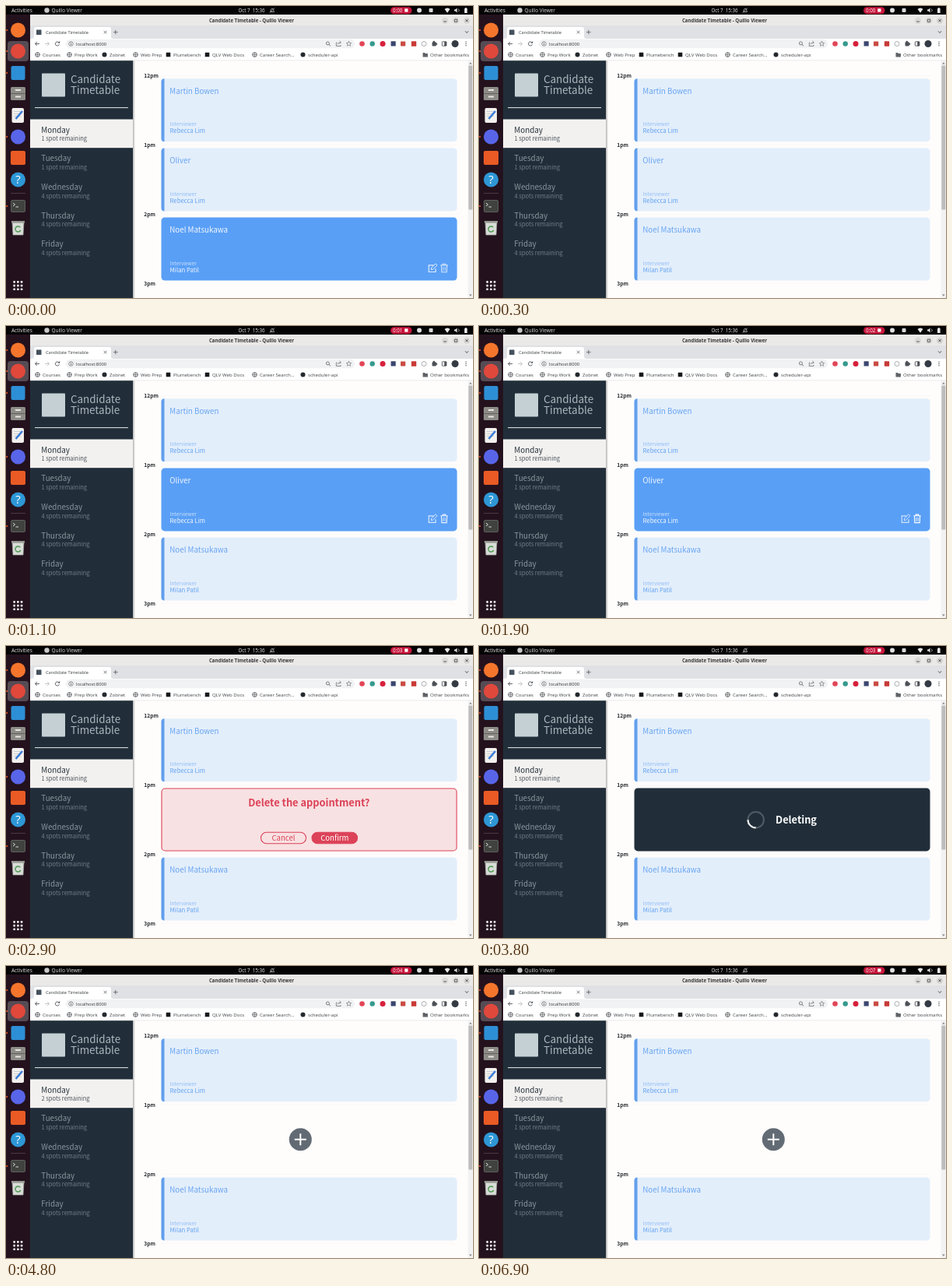
Write an HTML page with a canvas that moves like this. It is 600 px wide and 375 px high and loops after 7.9 s.

```html
<!DOCTYPE html>
<html lang="en">
<head>
<meta charset="utf-8">
<title>Candidate Timetable</title>
<style>
html, body { margin: 0; width: 100%; height: 100%; overflow: hidden; background: #fefdfc; }
canvas { display: block; width: 600px; height: 375px; }
</style>
</head>
<body>
<canvas id="stage"></canvas>
<script>
const LOOP = 7900;
const UI = '"Open Sans", "Noto Sans", sans-serif';
const PAGE = '"Noto Sans CJK JP", "Noto Sans CJK SC", "Noto Sans CJK KR", "Noto Sans CJK", "Noto Sans", sans-serif';
const NAVY = '#212e3a', BLUE = '#599ff6', RED = '#dc4258';

const canvas = document.getElementById('stage');
const ctx = canvas.getContext('2d');
const dpr = window.devicePixelRatio || 1;
canvas.width = 600 * dpr;
canvas.height = 375 * dpr;

function rect(x, y, w, h, fill) {
  ctx.fillStyle = fill;
  ctx.fillRect(x, y, w, h);
}

function round(x, y, w, h, r, fill, stroke, lw = 1) {
  ctx.beginPath();
  ctx.roundRect(x, y, w, h, r);
  if (fill) { ctx.fillStyle = fill; ctx.fill(); }
  if (stroke) { ctx.strokeStyle = stroke; ctx.lineWidth = lw; ctx.stroke(); }
}

function circle(x, y, r, fill, stroke, lw = 1) {
  ctx.beginPath();
  ctx.arc(x, y, r, 0, Math.PI * 2);
  if (fill) { ctx.fillStyle = fill; ctx.fill(); }
  if (stroke) { ctx.strokeStyle = stroke; ctx.lineWidth = lw; ctx.stroke(); }
}

function arc(x, y, r, a, b, color, lw) {
  ctx.beginPath();
  ctx.arc(x, y, r, a, b);
  ctx.strokeStyle = color;
  ctx.lineWidth = lw;
  ctx.stroke();
}

function path(d, color, lw = 1, fill) {
  const p = new Path2D(d);
  if (fill) { ctx.fillStyle = fill; ctx.fill(p); }
  if (color) { ctx.strokeStyle = color; ctx.lineWidth = lw; ctx.stroke(p); }
}

function text(str, x, y, size, color, font = UI, weight = 400, align = 'left') {
  ctx.font = `${weight} ${size}px ${font}`;
  ctx.textAlign = align;
  ctx.fillStyle = color;
  ctx.fillText(str, x, y);
}

function at(x, y, draw) {
  ctx.save();
  ctx.translate(x, y);
  draw();
  ctx.restore();
}

function topBar(t) {
  rect(0, 0, 600, 11, '#050405');
  text('Activities', 7, 7.8, 6.5, '#e4e4e4');
  circle(52.5, 5.5, 3.2, '#c8c8c8');
  text('Quillo Viewer', 58.5, 7.8, 6.4, '#e4e4e4');
  text('Oct 7  15:36', 315.5, 7.8, 6.2, '#ececec', UI, 500, 'center');
  path('M339.5 7.5H344.5L343.8 6V4.5Q342 1.6 340.2 4.5V6ZM339 8.5L345 2.5', '#d0d0d0', 0.7);

  round(494, 1.2, 27.5, 9, 4.5, '#c5143a');
  text('0:0' + Math.floor((t + 100) / 1000), 497, 7.9, 6.2, '#fff');
  rect(512.2, 3.4, 4.2, 4.2, '#fff');

  circle(531, 5.5, 3, '#e0e0e0');
  round(543.5, 3, 5, 5, 1, '#d8d8d8');
  path('M563.5 4Q567 0.9 570.5 4L567 8.8Z', null, 0, '#e8e8e8');
  path('M576 4.4H577.5L579.5 2.5V8.5L577.5 6.6H576Z', null, 0, '#e8e8e8');
  arc(579.7, 5.5, 2.4, -0.9, 0.9, '#e8e8e8', 0.7);
  round(589, 3, 3.6, 6, 0.6, '#e8e8e8');
  rect(590, 2.2, 1.6, 1, '#e8e8e8');
}

function dock() {
  rect(0, 11, 31, 364, '#23121d');
  round(2, 45, 27, 26, 4, '#574b53');
  circle(15.5, 31, 9.5, '#f5752c');
  circle(15.5, 58, 9.5, '#e0483c');
  round(6.5, 77, 18, 18, 2, '#2d8fd5');

  round(6, 104, 19, 17, 1.5, '#8d8c87');
  rect(6, 112, 19, 1, '#63625f');
  rect(12, 107, 7, 2, '#e9e7e2');
  rect(12, 115.5, 7, 2, '#e9e7e2');

  round(7.5, 131, 15.5, 19, 2, '#f2f0ed');
  [135, 138, 141].forEach(y => rect(10, y, 9, 0.7, '#b9c3cf'));
  path('M12.5 145L21 135', '#3a7bd8', 2.6);

  circle(15.5, 168, 9.5, '#5865e8');
  round(6, 186, 19, 18, 2, '#e95a25');
  circle(15.5, 223, 9.5, '#2e97d6');
  text('?', 15.5, 228.4, 15, '#fff', UI, 400, 'center');
  rect(6, 240, 19, 0.7, '#5a4c55');

  round(6.5, 249.5, 18, 15, 1.5, '#3f423f', '#6b6e6a', 0.8);
  path('M9 253L11.5 255L9 257M12.5 258H16', '#e9e9e9', 0.9);

  path('M8 277H23L22 294H9Z', '#a5a8a3', 0.7, '#d9dcd7');
  rect(7, 276, 17, 2.6, '#949891');
  arc(15.5, 286.5, 3.5, 0.4, 5.6, '#4f9a55', 1.5);

  for (const y of [31, 58, 86, 168, 257]) circle(1.2, y, 1.1, '#e95420');
  for (let i = 0; i < 9; i++) {
    round(9.3 + i % 3 * 4.7, 353 + Math.floor(i / 3) * 4.7, 2.7, 2.7, 0.7, '#f0eeef');
  }
}

function bookmark(label, x, icon) {
  text(label, x, 64.6, 6.1, '#404347');
  const cx = x - 6.5, cy = 62.5;
  if (icon === 'folder') {
    path(`M${cx - 3} ${cy - 2.5}h2.4l1 1h3v4.5h-6.4z`, null, 0, '#5f6368');
  } else if (icon === 'globe') {
    circle(cx, cy, 2.8, null, '#4b4f54', 0.9);
    path(`M${cx - 2.8} ${cy}h5.6M${cx} ${cy - 2.8}v5.6`, '#4b4f54', 0.6);
  } else if (icon === 'square') {
    round(cx - 2.8, cy - 2.8, 5.6, 5.6, 0.4, '#17191c');
  } else {
    circle(cx, cy, 3, '#24292e');
  }
}

function browser() {
  rect(31, 11, 569, 15, '#ebe9e8');
  text('Candidate Timetable - Quillo Viewer', 315.5, 21.1, 6.1, '#37383a', UI, 700, 'center');
  for (const x of [564, 578, 592]) circle(x, 18.7, 4.2, '#dad8d6');
  path('M562.2 20H565.8', '#333', 0.8);
  path('M576.4 17.2H579.6V20.4H576.4Z', '#333', 0.7);
  path('M590.4 17.1L593.6 20.3M593.6 17.1L590.4 20.3', '#333', 0.8);

  rect(31, 25, 569, 17, '#dfe1e4');
  path('M33 42Q36 42 36 39V30Q36 27 39 27H132Q135 27 135 30V39Q135 42 138 42Z', null, 0, '#fff');
  round(39, 30.5, 6.5, 6.5, 0.5, '#44515c');
  text('Candidate Timetable', 51, 36, 5.7, '#3c4043');
  path('M125.7 31.8L129.3 35.4M129.3 31.8L125.7 35.4', '#55595e', 0.8);
  path('M138 33.6H143.6M140.8 30.8V36.4', '#55595e', 0.8);
  path('M590 32.3L592 34.5L594 32.3', '#444', 0.9);

  rect(31, 42, 569, 28, '#fff');
  round(77, 42.8, 371, 11.5, 5.75, '#f0f2f3');
  path('M43 48.5H37.5M40 46L37.5 48.5L40 51', '#55595e', 0.9);
  path('M50 48.5H55.5M53 46L55.5 48.5L53 51', '#bdc0c4', 0.9);
  arc(66, 48.5, 2.6, 0.3, 5.5, '#55595e', 0.9);
  path('M69.2 45V47.8H66.4Z', null, 0, '#55595e');
  circle(83.5, 48.5, 2.7, null, '#5f6368', 0.7);
  rect(83.1, 48, 0.8, 2, '#5f6368');
  rect(83.1, 46.7, 0.8, 0.8, '#5f6368');
  text('localhost:8000', 90, 50.9, 5.8, '#33373b');

  circle(413.4, 47.9, 2, null, '#5f6368', 0.8);
  path('M414.9 49.4L417 51.4', '#5f6368', 0.9);
  path('M425.5 47H424.3V51.5H430V50M426 49.5Q426.5 46.8 430 46.8M428.5 45L430.4 46.8L428.5 48.5', '#5f6368', 0.7);
  path('M440.5 45.2L441.4 47.3L443.7 47.5L442 49L442.5 51.3L440.5 50.1L438.5 51.3L439 49L437.3 47.5L439.6 47.3Z', '#5f6368', 0.6);

  circle(457.5, 48.5, 3.3, '#e14658');
  circle(470.7, 48.5, 3.2, '#35998c');
  circle(484, 48.5, 3.5, '#d8203c');
  round(494.5, 45.3, 6.2, 6.2, 0.5, '#3c4770');
  round(507, 45.5, 6.2, 6, 0.5, '#c94b43');
  round(520.8, 45.3, 6.4, 6.4, 0.5, '#c83a36');
  circle(537, 48.5, 3, null, '#9fa3a7', 0.9);
  round(547.5, 46.3, 5.2, 5.2, 0.8, '#4c5055');
  circle(549.8, 46, 1.3, '#4c5055');
  circle(553, 48.8, 1.2, '#4c5055');
  round(560.3, 45.8, 5.6, 5.4, 0.6, null, '#4c5055', 0.9);
  rect(563.2, 45.8, 2.7, 5.4, '#4c5055');
  circle(577, 48.5, 4.5, '#343a42');
  for (let i = -1; i < 2; i++) circle(591, 48.5 + i * 2.2, 0.7, '#4c5055');

  bookmark('Courses', 47, 'globe');
  bookmark('Prep Work', 88, 'globe');
  bookmark('Zobnet', 133, 'dot');
  bookmark('Web Prep', 173, 'globe');
  bookmark('Plumebench', 215, 'square');
  bookmark('QLV Web Docs', 265, 'square');
  bookmark('Career Search…', 326, 'globe');
  bookmark('scheduler-api', 388, 'dot');
  bookmark('Other bookmarks', 545, 'folder');
  rect(31, 69.6, 569, 0.6, '#dedfe0');
}

function sidebar(t) {
  const shade = ctx.createLinearGradient(163, 0, 166, 0);
  shade.addColorStop(0, 'rgba(0,0,0,0.3)');
  shade.addColorStop(1, 'rgba(0,0,0,0)');
  rect(163, 70, 3, 305, shade);

  rect(31, 70, 132, 305, NAVY);
  round(46, 86.5, 30, 30, 1, '#c4d0d3');
  text('Candidate', 83, 99.2, 13.4, '#adb6bd', PAGE, 300);
  text('Timetable', 83, 112.6, 13.4, '#adb6bd', PAGE, 300);
  rect(37, 130, 120, 1.1, '#d4d8da');
  rect(31, 145.5, 132, 36.7, '#f3f1ef');

  const days = ['Monday', 'Tuesday', 'Wednesday', 'Thursday', 'Friday'];
  const spots = [t < 4600 ? 1 : 2, 1, 4, 4, 4];
  days.forEach((day, i) => {
    const y = 162.5 + i * 36.7, n = spots[i];
    text(day, 45.3, y, 9.8, i ? '#8c959c' : '#26323d', PAGE);
    text(`${n} spot${n > 1 ? 's' : ''} remaining`, 45.5, y + 10.7, 7.5, i ? '#737d86' : '#4a545e', PAGE, 300);
  });
}

function editIcon(x, y, color) {
  at(x, y, () => {
    path('M1.5 -3.6H-4.8V5H4V0.8', color, 1.2);
    path('M-1.8 2.2L-1.4 -0.4L4 -5.6L6 -3.6L0.7 1.6Z', color, 1);
  });
}

function trashIcon(x, y, color) {
  at(x, y, () => {
    path('M-4.7 -3.6H4.7M-1.7 -3.8V-5.3H1.7V-3.8M-3.6 -3.3L-3.2 5.2H3.2L3.6 -3.3', color, 1.1);
    path('M-1.5 -1.5V3.4M0 -1.5V3.4M1.5 -1.5V3.4', color, 0.6);
  });
}

function card(y, name, host, hover, glow = 0) {
  round(199.5, y, 380, 81, 4.5, hover ? BLUE : '#e3eefb');
  if (!hover) round(199.5, y, 4, 81, [4.5, 0, 0, 4.5], '#629fec');
  text(name, 210.3, y + 19.3, 9.75, hover ? '#f4f8fe' : '#66a4f0', PAGE);
  text('Interviewer', 210.5, y + 61.2, 6.45, hover ? '#cfe2fc' : '#8fbcf4', PAGE, 300);
  text(host, 210.5, y + 70.1, 7.75, hover ? '#f4f8fe' : '#62a2f0', PAGE);
  if (hover) {
    editIcon(548, y + 65, `rgba(255,255,255,${0.8 - glow * 0.1})`);
    trashIcon(563, y + 65, `rgba(255,255,255,${0.72 + glow * 0.28})`);
  }
}

function button(label, x, w, filled) {
  round(x, 239.2, w, 14.6, 7.3, filled ? RED : null, RED, 1.1);
  text(label, x + w / 2, 250, 9.6, filled ? '#fff' : RED, PAGE, 400, 'center');
}

function confirmCard(hover) {
  round(200, 183, 379, 80, 4.5, '#f8e1e2', RED, 1.1);
  text('Delete the appointment?', 389.3, 206, 12.8, RED, PAGE, 600, 'center');
  button('Cancel', 327.5, 58, false);
  button('Confirm', 393, 58.5, hover);
}

function deletingCard(t) {
  round(199.5, 182.4, 380, 81, 4.5, NAVY);
  const turn = (t - 3800) / 1000 * Math.PI * 2;
  circle(355.7, 223.2, 10.2, null, '#505a64', 2.1);
  arc(355.7, 223.2, 10.2, turn + Math.PI / 2, turn + Math.PI, '#f1f2f3', 2.1);
  text('Deleting', 381, 227.9, 12.8, '#fff', PAGE, 600);
}

function addButton() {
  circle(378.3, 222.8, 14.5, '#626b74');
  path('M370.8 222.8H385.8M378.3 215.3V230.3', '#fff', 2);
}

function schedule(t) {
  rect(163, 70, 437, 305, '#fefdfc');
  ['12pm', '1pm', '2pm', '3pm'].forEach((hour, i) => {
    const y = 89.3 + i * 89.1;
    text(hour, 177.3, y + 2.6, 6.7, '#26292c', PAGE, 600);
    rect(199.5, y - 0.3, 380, 0.5, '#f4f3f3');
  });
  card(93.2, 'Martin Bowen', 'Rebecca Lim', false);
  card(271.5, 'Noel Matsukawa', 'Milan Patil', t < 300);

  if (t < 2400) {
    const glow = Math.min(1, Math.max(0, (t - 900) / 400));
    card(182.4, 'Oliver', 'Rebecca Lim', t >= 400, glow);
  } else if (t < 3800) {
    confirmCard(t >= 2900);
  } else if (t < 4600) {
    deletingCard(t);
  } else {
    addButton();
  }

  rect(593.5, 70, 6.5, 305, '#f3f2f2');
  round(594.3, 76.5, 5, 185, 0.5, '#bebdbd');
  path('M595 74.5L596.8 72.4L598.6 74.5Z', null, 0, '#777');
  path('M595 370.5L596.8 372.6L598.6 370.5Z', null, 0, '#777');
}

function draw(now) {
  const t = now % LOOP;
  ctx.setTransform(dpr, 0, 0, dpr, 0, 0);
  schedule(t);
  sidebar(t);
  browser();
  dock();
  topBar(t);
}

const start = performance.now();
function tick() {
  draw(performance.now() - start);
  requestAnimationFrame(tick);
}
tick();
</script>
</body>
</html>
```
